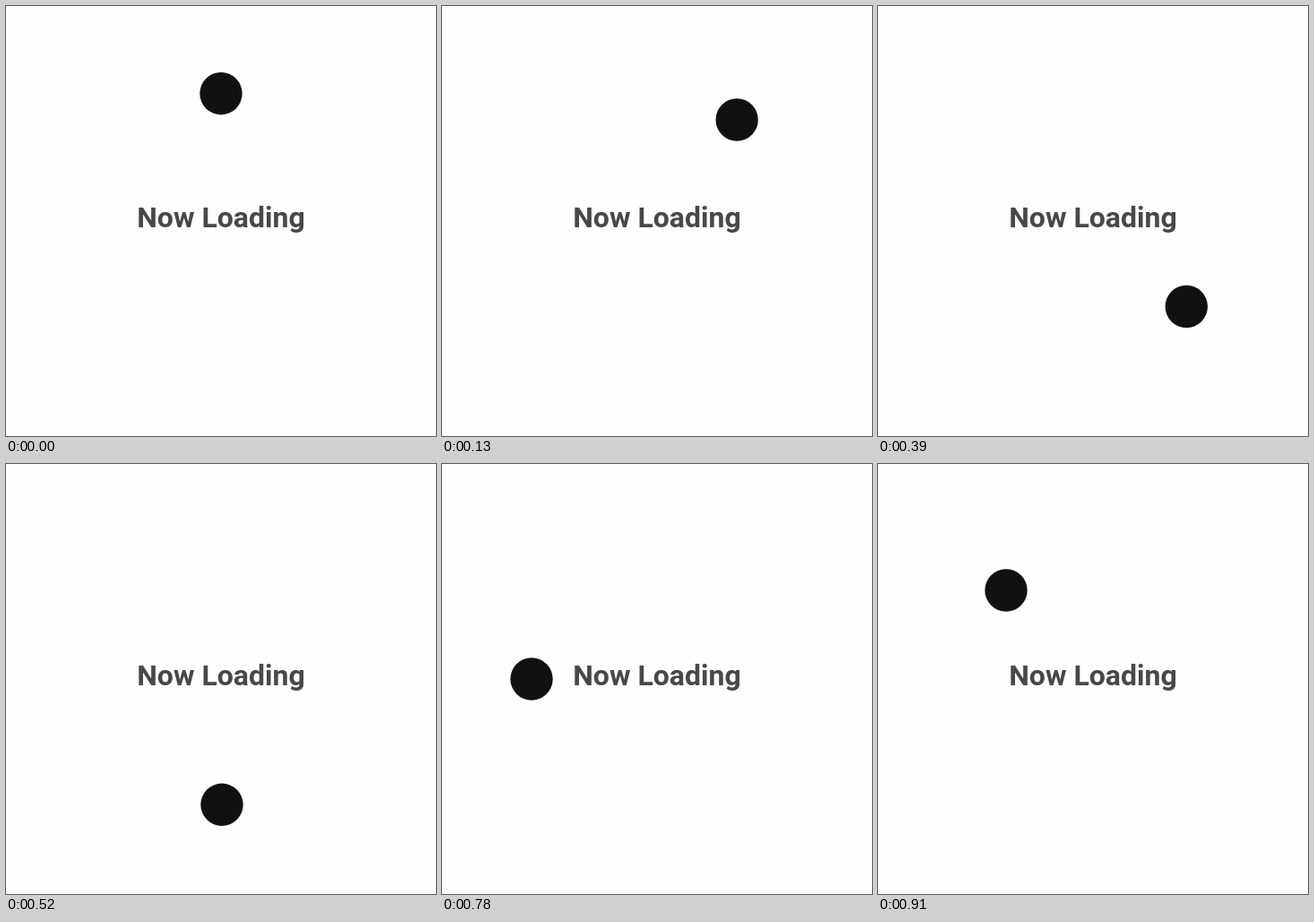
Write an HTML page that moves like this. It is 480 px wide and 480 px high and loops after 1040 ms.

```html
<!DOCTYPE html>
<html lang="en">
<head>
<meta charset="utf-8">
<title>Now Loading</title>
<style>
  html, body { margin: 0; height: 100%; overflow: hidden; background: #fefefe; }
  svg { display: block; width: 100%; height: 100%; }
  text { font: 700 32px Roboto, sans-serif; fill: #484848; text-anchor: middle; }
</style>
</head>
<body>
<svg viewBox="0 0 480 480">
  <text x="240" y="247">Now Loading</text>
  <circle id="ball" r="23.7" fill="#111"/>
</svg>
<script>
  const STEP = 130;
  // Ball centres, clockwise from the top; it jumps from one to the next.
  const stops = [
    [240, 97.7], [329.2, 127], [383.3, 237], [344.3, 335.5],
    [241, 380.3], [142, 339.5], [100, 240], [143, 141]
  ];
  const ball = document.getElementById('ball');

  function draw(now) {
    const [x, y] = stops[Math.floor(now / STEP) % stops.length];
    ball.setAttribute('cx', x);
    ball.setAttribute('cy', y);
    requestAnimationFrame(draw);
  }
  draw(performance.now());
</script>
</body>
</html>
```
